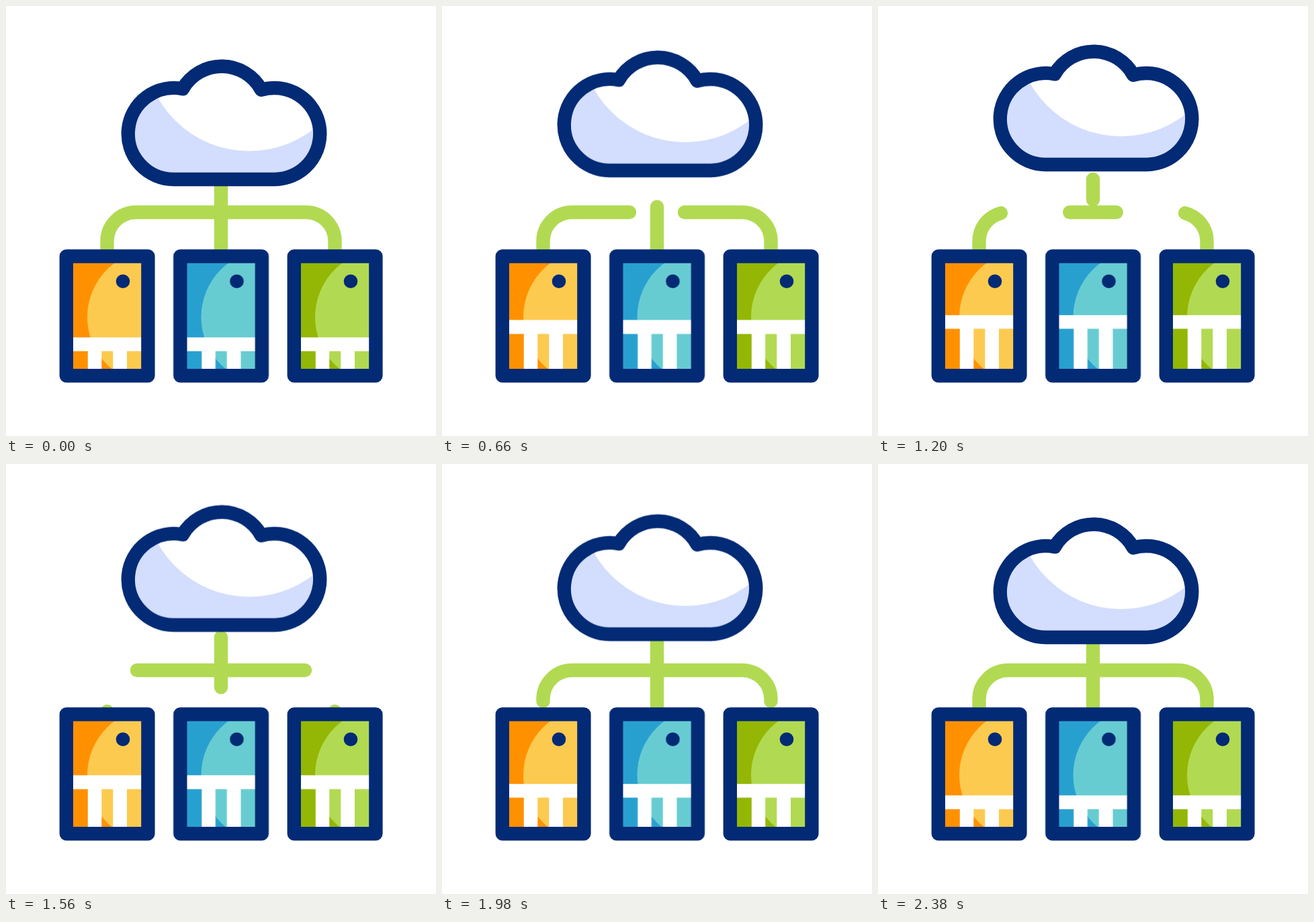
An HTML page for the animation above (2.4 s loop, 640 by 640 pixels).

```html
<!DOCTYPE html>
<html lang="en">
<head>
<meta charset="utf-8">
<title>Cloud servers</title>
<style>
  html, body { margin: 0; width: 100%; height: 100%; overflow: hidden; background: #fff; }
  svg { display: block; width: 100vw; height: 100vh; }

  .cloud, .shelf, .line { animation: 2400ms linear infinite; }
  .outline { fill: none; stroke: #032a75; stroke-width: 20.4; stroke-linejoin: round; }
  .line { fill: none; stroke: #b1da52; stroke-width: 20.4; stroke-linecap: round; stroke-dasharray: 300 300; }

  .cloud { animation-name: float; }
  .shelf { animation-name: fill; }
  .stem.out { animation-name: stem-out; }
  .stem.in { animation-name: stem-in; }
  .arm.out { animation-name: arm-out; }
  .arm.in { animation-name: arm-in; }

  @keyframes float {
    0% { transform: translateY(0); animation-timing-function: cubic-bezier(.5, 0, .5, 1); }
    50% { transform: translateY(-22px); animation-timing-function: cubic-bezier(.5, 0, .5, 1); }
    99.17%, 100% { transform: translateY(0); }
  }
  @keyframes fill {
    0% { transform: translateY(0); animation-timing-function: cubic-bezier(.36, .57, .64, 1); }
    50% { transform: translateY(-33.4px); animation-timing-function: cubic-bezier(.36, 0, .64, .42); }
    99.17%, 100% { transform: translateY(0); }
  }

  /* Lines retract into the cards, then grow again from the cloud. */
  @keyframes stem-out {
    0% { stroke-dashoffset: 0; visibility: visible; animation-timing-function: cubic-bezier(.36, .03, .64, .44); }
    50%, 100% { stroke-dashoffset: -114px; visibility: hidden; }
  }
  @keyframes stem-in {
    0% { stroke-dashoffset: 300px; visibility: hidden; animation-timing-function: step-end; }
    40.83% { stroke-dashoffset: 300px; visibility: visible; animation-timing-function: cubic-bezier(.36, .57, .64, 1); }
    95%, 100% { stroke-dashoffset: 186px; visibility: visible; }
  }
  @keyframes arm-out {
    0% { stroke-dashoffset: 0; visibility: visible; }
    12.5% { stroke-dashoffset: 0; visibility: visible; animation-timing-function: cubic-bezier(.33, .15, .67, .59); }
    65.83%, 100% { stroke-dashoffset: -216px; visibility: hidden; }
  }
  @keyframes arm-in {
    0% { stroke-dashoffset: 300px; visibility: hidden; animation-timing-function: step-end; }
    44.58% { stroke-dashoffset: 300px; visibility: visible; animation-timing-function: cubic-bezier(.36, .56, .62, 1); }
    97.5%, 100% { stroke-dashoffset: 84px; visibility: visible; }
  }
</style>
</head>
<body>
<svg viewBox="0 0 640 640">
  <defs>
    <path id="puff" d="M249.5 258A68 68 0 1 1 263 123.3A67 67 0 0 1 380 124.8A68 68 0 1 1 400 258Z"/>
    <clipPath id="puffClip"><use href="#puff"/></clipPath>
    <clipPath id="cardClip"><rect x="90" y="373" width="121" height="177"/></clipPath>
    <path id="stem" d="M320 258V372"/>
    <path id="armL" d="M320 307H193.5A43 43 0 0 0 150.5 350V390"/>
    <path id="armR" d="M320 307H446.5A43 43 0 0 1 489.5 350V390"/>
  </defs>

  <use href="#armL" class="line arm out"/>
  <use href="#armR" class="line arm out"/>
  <use href="#stem" class="line stem out"/>
  <use href="#armL" class="line arm in"/>
  <use href="#armR" class="line arm in"/>
  <use href="#stem" class="line stem in"/>

  <g class="cloud">
    <use href="#puff" fill="#d3ddfd"/>
    <circle cx="362" cy="60" r="156" fill="#fff" clip-path="url(#puffClip)"/>
    <use href="#puff" class="outline"/>
  </g>

  <g id="cards"></g>
</svg>
<script>
  const card = ([dark, light], i) => `
    <g transform="translate(${i * 169.5} 0)">
      <g clip-path="url(#cardClip)">
        <rect x="90" y="373" width="121" height="177" fill="${dark}"/>
        <circle cx="221" cy="463" r="100" fill="${light}"/>
        <path class="shelf" fill="#fff" d="M90 493.2H211V513.8H180V600H159.3V513.8H142.3V600H121.8V513.8H90Z"/>
      </g>
      <circle cx="174" cy="409.7" r="10.3" fill="#032a75"/>
      <rect class="outline" x="89.8" y="372.5" width="121.6" height="177.8"/>
    </g>`;

  document.getElementById('cards').innerHTML = [
    ['#ff9100', '#fdca50'],
    ['#28a0cf', '#67ccd2'],
    ['#93b704', '#b1da52']
  ].map(card).join('');
</script>
</body>
</html>
```
